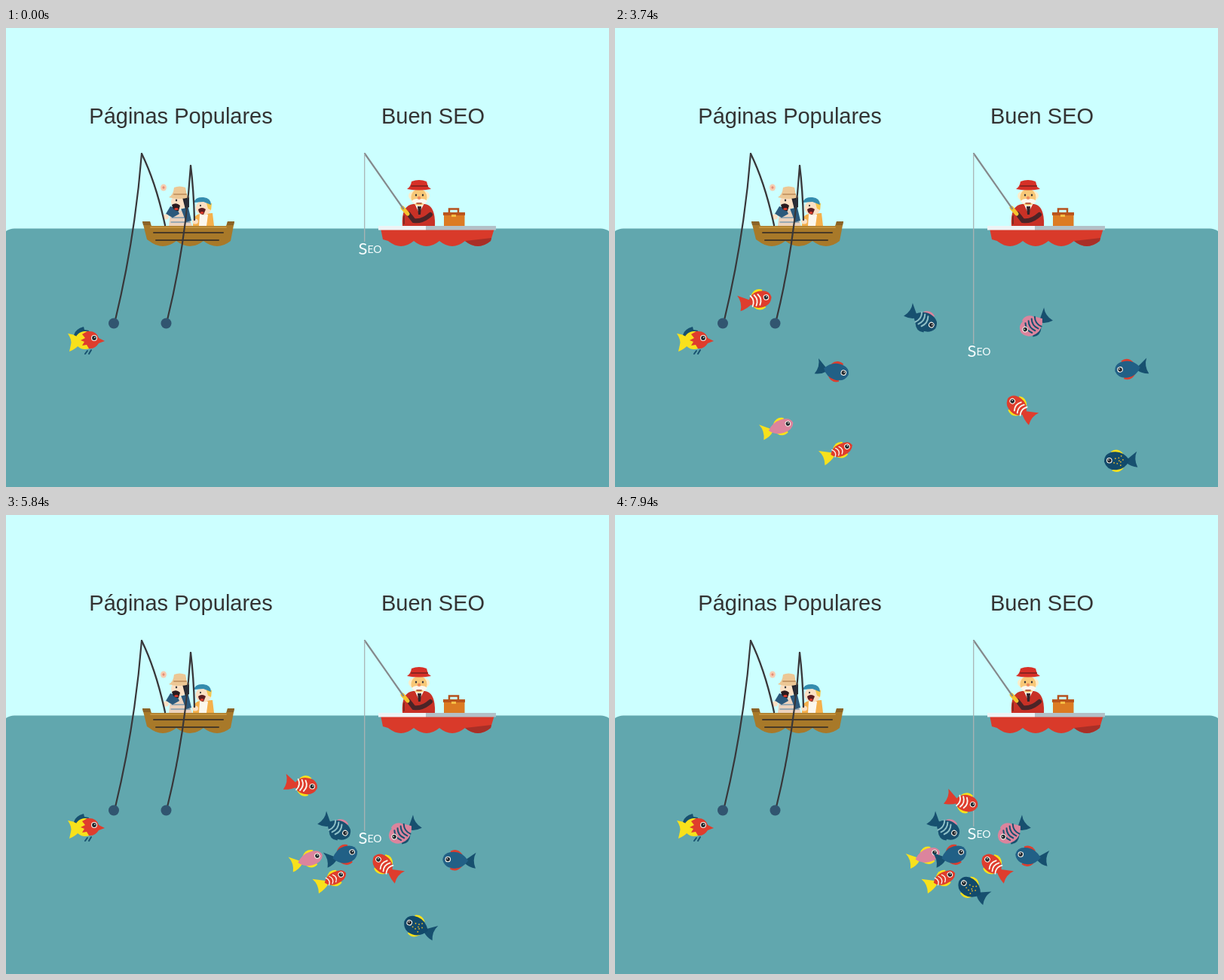
Animation of 800x610 px, one loop 8000 ms. Source, as an HTML page:

```html
<!DOCTYPE html>
<html lang="es">
<head>
<meta charset="utf-8">
<title>Pesca y SEO</title>
<style>
html, body { margin: 0; width: 100%; height: 100%; overflow: hidden; background: #cff; }
svg { display: block; width: 800px; height: 610px; }
.title { font: 29px "Liberation Sans", Arial, sans-serif; fill: #333; }
.bait { font: 22px Lato, sans-serif; fill: #f6fdfd; }
</style>
</head>
<body>
<svg id="stage" viewBox="0 0 800 610"></svg>
<script>
const RED = '#df3d2d', YELLOW = '#f8e11c', BLUE = '#17506f', SEA = '#61a7ae',
      PINK = '#dc849d', SKIN = '#fbe0c4', DARK = '#38373a', WHITE = '#fbf7ee';
const LOOP = 8000;

const shape = (d, fill) => `<path d="${d}" fill="${fill}"/>`;
const line = (d, color, w) =>
  `<path d="${d}" fill="none" stroke="${color}" stroke-width="${w}" stroke-linecap="round"/>`;
const oval = (x, y, rx, ry, fill) => `<ellipse cx="${x}" cy="${y}" rx="${rx}" ry="${ry}" fill="${fill}"/>`;
const rect = (x, y, w, h, fill) => `<rect x="${x}" y="${y}" width="${w}" height="${h}" fill="${fill}"/>`;
const repeat = (n, part) => Array.from({ length: n }, (_, i) => part(i)).join('');
const eye = (x, y, r) => oval(x, y, r, r, WHITE) + oval(x, y, r * .72, r * .72, '#22272e') +
  oval(x + .8, y - .8, .8, .8, WHITE);

// A fish facing right, centred on 0,0; h is half its height, back the rear end of its body
function fishBody({ body, tail, fin, low = fin, h = 11, back = -12, stripe, stripes = 0, spots = 0 }) {
  const finPath = s => `M-4 ${s * (h - 3)}Q3 ${s * (h + 6)} 12 ${s * (h + 1)}L10 ${s * (h - 4)}Z`;
  return shape(finPath(-1), fin) + shape(finPath(1), low) +
    shape(`M${back + 5} 0L-22-11Q-17-1-22 10Q-13 9 ${back + 5} 3Z`, tail) +
    shape(`M${back} 0Q-4 ${-h} 7 ${-h}Q21 ${-h} 22 0Q19 ${h} 6 ${h}Q-5 ${h} ${back} 0Z`, body) +
    repeat(stripes, i => line(`M${5 * i - 5} ${-.65 * h}q5 ${.65 * h} 0 ${1.3 * h}`, stripe, h / 6)) +
    repeat(spots, i => oval(2 + 2.6 * Math.sqrt(i) * Math.cos(2.4 * i), 2.6 * Math.sqrt(i) * Math.sin(2.4 * i), .9, .9, '#e9b92f')) +
    eye(15, -1, 3.8);
}

const BLUE_FISH = { body: '#216086', tail: BLUE, fin: RED };
const RED_FISH = { body: RED, tail: RED, fin: YELLOW, back: -9, stripe: WHITE, stripes: 3 };
const PINK_FISH = { body: PINK, tail: BLUE, fin: PINK, low: BLUE, h: 12, stripe: BLUE, stripes: 4 };
const STRIPED_FISH = { body: BLUE, tail: BLUE, fin: PINK, low: BLUE, h: 12, stripe: '#8fc0c7', stripes: 3 };
const SPOTTED_FISH = { body: '#124a6b', tail: BLUE, fin: YELLOW, h: 12, spots: 9 };
const BLUSH_FISH = { body: PINK, tail: YELLOW, fin: YELLOW, h: 9 };
const GOLD_FISH = { body: RED, tail: YELLOW, fin: YELLOW, h: 8, back: -9, stripe: WHITE, stripes: 3 };

// Each fish swims at a steady speed (px/s) from one point to another along an arc
const swimmers = [
  { look: BLUSH_FISH, from: [128, 566], to: [410, 454] },
  { look: GOLD_FISH, from: [213, 610], to: [431, 485] },
  { look: RED_FISH, from: [186, 362], to: [460, 381], bow: -23, shown: 1.84, leave: 3.74, speed: 98 },
  { look: STRIPED_FISH, from: [338, 323], to: [437, 415] },
  { look: PINK_FISH, from: [626, 329], to: [528, 420] },
  { look: BLUE_FISH, from: [225, 425], to: [445, 453], bow: 27, shown: 1.84, leave: 3.1, speed: 100 },
  { look: BLUE_FISH, from: [725, 443], to: [553, 454], bow: 10, speed: 40 },
  { look: RED_FISH, from: [600, 577], to: [505, 468] },
  { look: SPOTTED_FISH, from: [729, 563], to: [475, 498], bow: 38, speed: 60 },
];

const beakFish = `<g transform="translate(106 415)">` +
  shape('M-10-6L-24-9Q-18 0-20 6L-22 15Q-14 12-9 6Z', YELLOW) +
  shape('M-16-7Q-14-15-3-18L-2-14 4-13 2-8-10-4Z', BLUE) +
  oval(-1, 0, 13, 12, YELLOW) +
  shape('M-5-8L2-12Q14-13 17-3L25 1 17 4Q12 12 4 11L1 6-5 7-2 2-7 0-1-3Z', RED) +
  line('M2 14L-1 18M7 13L4 18', BLUE, 2) + eye(11, -3, 4) + '</g>';

const father =
  oval(209, 212, 4, 4.5, '#f6cdb0') + oval(209, 212, 1.6, 1.8, '#e58d77') +
  shape('M216 263L218 246Q228 238 241 246L247 263Z', '#ecd2bd') +
  line('M220 252H242M219 258H244', '#7f9cb0', 1.4) +
  shape('M212 247L218 237 227 240 230 247 221 252ZM232 240L242 239 246 256 239 258Z', '#2c597c') +
  oval(212, 251, 4, 3.5, SKIN) + oval(230, 231, 11, 10, SKIN) +
  shape('M234 225H243V238L238 241 236 233Z', '#20212a') +
  shape('M220 235Q226 231 231 236L229 243Q222 244 220 235Z', '#2a1a1e') +
  oval(226, 240.5, 2.8, 1.6, RED) + oval(226, 229, 1.2, 1.4, DARK) +
  shape('M216 225Q222 222 223 212Q230 209 238 212L240 222 244 225Q230 229 216 225Z', '#ecc795') +
  line('M223 221H239', '#c79a68', 2);

const child =
  shape('M248 263Q248 246 260 247L274 246 276 263Z', '#f4b04c') +
  shape('M257 248H268L266 263H256Z', WHITE) + oval(251, 257, 4, 3.5, SKIN) +
  oval(262, 239, 10.5, 10, SKIN) + shape('M266 233H273L272 242 268 240Z', '#f3c54c') +
  shape('M255 241Q260 237 265 241L262 248Q256 248 255 241Z', '#5a1c20') +
  oval(260, 245.5, 2.4, 1.6, RED) + oval(258, 236, 1, 1.3, DARK) +
  shape('M249 232Q252 224 262 225Q272 226 272 235L262 231Z', '#348cae');

const leftHull =
  shape(`M181 257H191L193 263H292L294 257H303L298 283${'q-18 14-36 0'.repeat(3)}L187 281Z`, '#a87929') +
  shape('M181 257H191L192 262H182ZM294 257H303L302 262H293Z', '#8b6326') +
  line('M196 272H288M199 282H282', '#493a26', 2) + line('M192 265H292', '#c3923d', 2);

const oldMan =
  shape('M526 263Q524 236 540 234H556Q570 236 569 263Z', '#c83126') +
  shape('M542 233L548 246 555 233Z', WHITE) + shape('M546 237H551L550 248H547Z', '#34232a') +
  line('M534 247L541 256Q552 258 563 248', '#4b2427', 6) + line('M528 260V250', '#852820', 2) +
  line('M526 239L533 247', '#f6c32d', 5) +
  oval(548, 223, 14, 8, '#fbeecb') + oval(548, 225, 10.5, 11, '#f8c877') +
  oval(544, 222, 1.2, 1.5, DARK) + oval(553, 222, 1.2, 1.5, DARK) + oval(548, 226, 2.2, 2.6, '#ef8b5d') +
  shape('M538 230Q543 225 548 228Q554 225 559 230L555 234Q548 230 542 234Z', WHITE) +
  line('M545 233H551', '#a43a2c', 1.5) +
  shape('M532 214Q537 211 538 204Q548 200 558 204L560 211 564 214Q548 217 532 214Z', '#d63027') +
  line('M538 210H559', '#8c2420', 2);

const tackleBox =
  line('M588 246V240.5H600V246', '#b5501c', 2.5) +
  rect(581, 246, 27.5, 17, '#dc7b23') + rect(580, 245, 29, 4, '#b9551d') + rect(591, 248, 6, 3, '#f5bd43');

const rightHull =
  shape(`M497 266H648L643 283${'q-17 14-34 0'.repeat(4)}L500 281Z`, '#d93a2a') +
  shape('M609 283L644 279 643 283q-17 14-34 0Z', '#a82f27') +
  rect(494, 263, 63, 5.5, '#eef3f5') + rect(557, 263, 93, 5.5, '#b3c0c7');

const rods =
  line('M180 167Q199 206 211 262M245 183Q249 215 250 255', DARK, 2.3) +
  line('M180 167Q171 280 145 388M245 183Q238 290 214 388', DARK, 2.2) +
  rect(237, 228, 6, 9, '#2a2d36') +
  oval(143, 392.5, 7, 7, '#315570') + oval(212.5, 392.5, 7, 7, '#315570');

const stage = document.getElementById('stage');
stage.innerHTML =
  rect(0, 0, 800, 610, '#cff') +
  shape('M0 610V270Q5 266.5 11 266.5H789Q795 266.5 800 270V610Z', SEA) +
  '<text class="title" x="110.3" y="127">Páginas Populares</text>' +
  '<text class="title" x="498" y="127">Buen SEO</text>' +
  father + child + leftHull + rods + oldMan + tackleBox + rightHull + beakFish +
  line('M476 167L527 240', '#85898c', 2.2) +
  '<path id="thread" stroke="#a9b4b5" stroke-width="1.3"/>' +
  '<text id="bait" class="bait" x="467.5" y="301">S<tspan dy="-2" font-size="14">EO</tspan></text>' +
  swimmers.map(s => `<g class="fish">${fishBody(s.look)}</g>`).join('');

const bodies = stage.querySelectorAll('.fish');
const thread = document.getElementById('thread'), bait = document.getElementById('bait');

function swim(node, { from, to, bow = 0, shown = 2.74, leave = shown, speed = 94 }, t) {
  const dx = to[0] - from[0], dy = to[1] - from[1];
  const k = Math.min(1, Math.max(0, (t - leave) * speed / Math.hypot(dx, dy)));
  const x = from[0] + dx * k, y = from[1] + dy * k + 4 * bow * k * (1 - k);
  // Lean most of the way along the path
  const slope = (dy + 4 * bow * (1 - 2 * k)) / dx;
  const angle = .8 * Math.atan(slope) * 180 / Math.PI;
  node.setAttribute('visibility', t < shown ? 'hidden' : 'visible');
  node.setAttribute('transform', `translate(${x} ${y}) rotate(${angle}) scale(${Math.sign(dx)} 1)`);
}

function draw(ms) {
  // The picture steps ten times a second
  const t = Math.max(0, Math.floor((ms % LOOP + 60) / 100) * 100 - 60) / 1000;
  const drop = Math.min(136, 60 * t) - 60 * Math.max(0, t - 7.84);
  thread.setAttribute('d', `M475.7 167V${284 + drop}`);
  bait.setAttribute('transform', `translate(0 ${drop})`);
  swimmers.forEach((s, i) => swim(bodies[i], s, t));
}

const start = performance.now();
(function tick() {
  draw(performance.now() - start);
  requestAnimationFrame(tick);
})();
</script>
</body>
</html>
```
